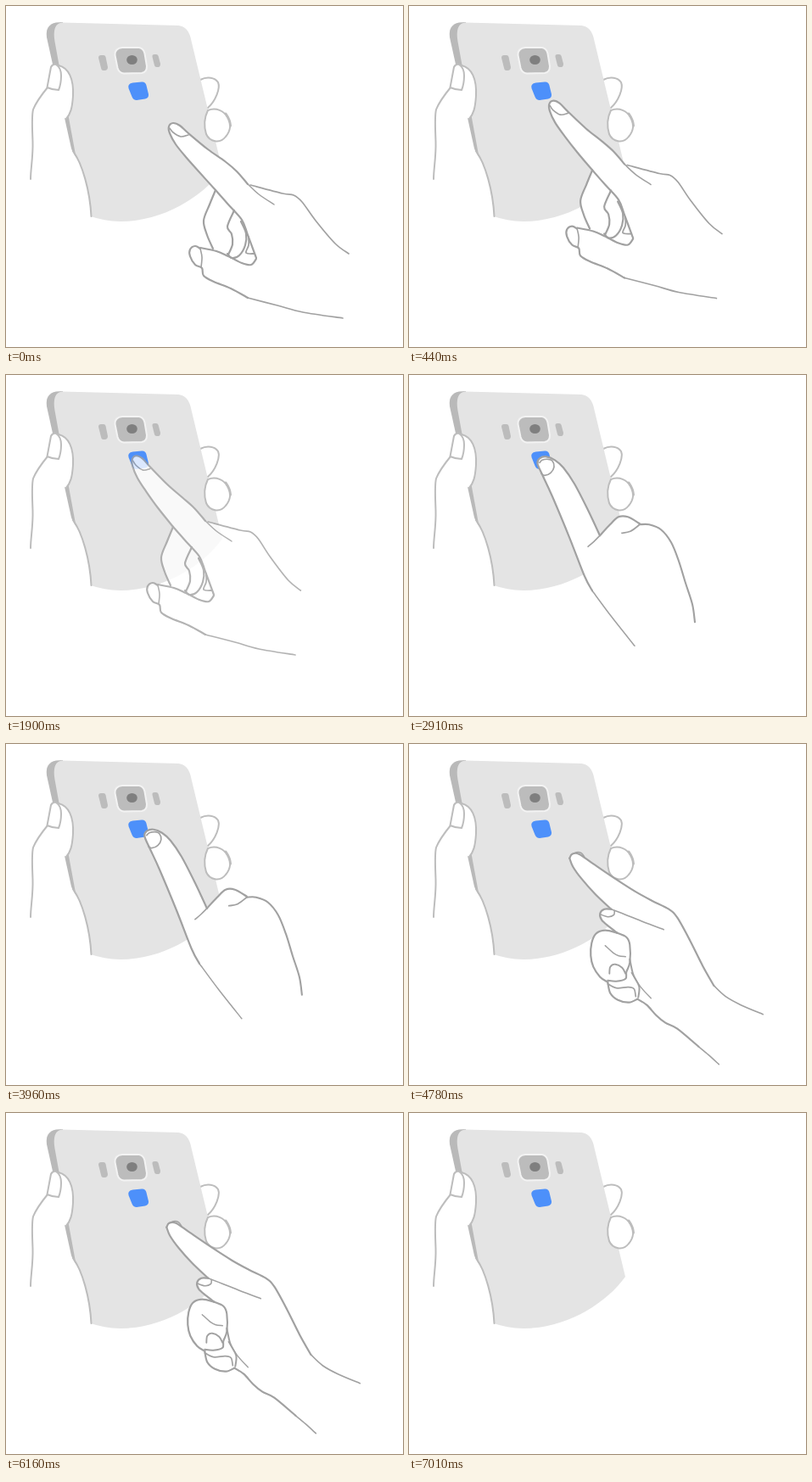
An HTML page for the animation above (7.39 s loop, 468 by 402 pixels).

```html
<!DOCTYPE html>
<html lang="en">
<head>
<meta charset="utf-8">
<title>Rear sensor tap</title>
<style>
html, body { margin: 0; width: 100%; height: 100%; overflow: hidden; background: #fff; }
svg { display: block; width: 468px; height: 402px; }
.grip { fill: #fff; stroke: #bdbdbd; stroke-width: 2; stroke-linecap: round; stroke-linejoin: round; }
.line { fill: none; }
.hand { fill: none; stroke: #a1a1a1; stroke-linecap: round; stroke-linejoin: round; }
.skin { fill: #fff; stroke: none; }
</style>
</head>
<body>
<svg viewBox="0 0 468 402">
  <g class="grip">
    <path d="M230 87C237 83 246 84 250 90C253 97 247 112 238 120L225 120Z" stroke="none"/>
    <path class="line" d="M229 87C237 83 246 84 250 90C253 97 247 112 238 120"/>
  </g>
  <path fill="#b9b9b9" d="M67 19L59 19.500Q46 22 48 37L77 168Q79 174 85 182L84 150Z"/>
  <path fill="#e4e4e4" d="M66 19.500L203 23Q214 24 217.500 37L255 193C232 225 185 254 135 254Q115 253.500 100 248C99 222 94 198 85 181Q82 177 81 170L57.500 42Q54 21 66 19.500Z"/>
  <g fill="#bcbcbc">
    <path stroke="#f3f3f3" stroke-width="2" d="M137 49L157 49Q162 50 163.500 56L166 71Q166 78 160 79L139 79.500Q133 79 131.500 73L128.500 58Q128 50 137 49Z"/>
    <path d="M109 61Q109 58 112 58L115 58Q117 58 117.500 60L120 72Q120 75.500 117 76L114.500 76Q112.500 76 112 73Z"/>
    <path d="M172.500 60Q172 57 175 57L177 57Q179 57 179.600 59L182 68Q182 71.500 180 72L177.500 72Q175.500 72 175 70Z"/>
  </g>
  <ellipse cx="148.500" cy="63.500" rx="6.300" ry="5.500" fill="#7f7f7f"/>
  <path fill="#4d90fa" d="M149.500 90.500L160 89.500Q164 89 165.300 93L168 104Q168.500 108.500 164 109.500L154 111Q150 111 148.500 107L144.500 97Q143 91.500 149.500 90.500Z"/>
  <g class="grip">
    <path d="M49 96L54 70L62 70C74 73 80 86 79 106C78 121 76 127 71 133L55 125Z" stroke="none"/>
    <path class="line" d="M29 204C29 192 32 178 31.500 160C31 145 30 130 32 122Q36 112 49 96M62 70C74 73 80 86 79 106C78 121 76 127 71 133M79 171C90 186 99 218 100.500 248"/>
    <path d="M48.500 96L53 72Q55 68 59 69Q65 73 65 82Q65 92 62 99Q55 99 48.500 96Z"/>
    <path d="M238 123C248 119 257 124 261 131C266 138 265 147 259 154C252 163 240 160 236 151C233 141 234 131 238 123Z"/>
    <path class="line" stroke-width="3" d="M259 127Q264 134 264.500 141"/>
  </g>
  <g id="hands"></g>
</svg>
<script>
const NS = 'http://www.w3.org/2000/svg';
const LOOP = 7390, STEP = 40;
const easeIn = p => t => t ** p;
const easeOut = p => t => 1 - (1 - t) ** p;
const easeInOut = p => t => t < .5 ? .5 * (2 * t) ** p : 1 - .5 * (2 - 2 * t) ** p;

// Bends the fingertip upwards and tucks the wrist in as the finger taps.
function bend([x, y], u) {
  const p = 1 - u;
  const tip = Math.max(0, 1 - Math.hypot(x - 194, y - 141) / 80);
  return [x + p * (7 * tip - 50 - Math.max(0, x - 330) * .09), y + p * (-5 * tip - 38)];
}

// lines: [points, stroke width]; skin: the parts that bound the white fill
// moves: [start, end, distance from, distance to, easing]
const hands = [
  {
    show: 0, fade: [1860, 2060],
    place: bend,
    lines: {
      wrist: ['404,292 388,280 365,253 349,231 339,223 326,221 288,211', 1.7],
      crease: ['316,234 298,222 285,210', 1.5],
      finger: ['285,210 272,195 258,183 238,169 215,150 205,141 197,138 192,142 193,150 200,163 212,178 228,196 247,217', 2.2],
      palm: ['247,217 262,234 278,252 285,270 295,297', 2.2],
      nail: ['193,144 197,149 206,154 215,152', 1.6],
      curl: ['247,217 240,234 233,253 237,270 244,286', 2.2],
      second: ['269,241 261,260 266,269 267,281 262,293', 2.2],
      third: ['277,254 283,268 282,282 275,294 266,297 261,292', 2.2],
      fourth: ['286,272 286,282 283,291 293,292', 1.8],
      base: ['229,285 248,289 262,295 278,303 289,305 295,298', 2.2],
      thumb: ['229,286 223,283 217,287 217,295 223,305 231,309 233,318 245,325 265,333 285,344', 2.2],
      thumbNail: ['229,286 231,296 230,308', 1.6],
      heel: ['285,344 320,353 350,361 397,368', 1.7]
    },
    skin: ['finger', 'curl', 'thumb', 'heel', 'wrist'],
    moves: [
      [0, 560, 1, 0, easeIn(2)],
      [810, 1250, 0, .97, easeOut(3)],
      [1250, 1650, .97, 0, easeIn(2.5)]
    ]
  },
  {
    show: 2230, fade: [4290, 4490],
    place: ([x, y], u) => [x - 5 + 38 * u, y - 1 + 27 * Math.min(u * u, u)],
    lines: {
      arm: ['267,320 240,286 217,255', 1.5],
      finger: ['217,255 208,238 190,192 170,144 158,118 152.5,105 155,99 163,97 173,101 183,110 196,129 212,160 226,190', 2.2],
      nail: ['157,117 161,119 168,116 172,109 170,102 165,100 158,101 155,104', 1.7],
      web: ['212,203 219,197 226,190', 1.6],
      knuckle: ['226,190 238,177 248,168 259,168 273,176', 2.2],
      fold: ['252,187 262,185 273,177', 1.8],
      back: ['273,177 284,177 298,183 310,198 319,220 327,246 335,271 338,292', 2.1]
    },
    skin: ['arm', 'finger', 'knuckle', 'back'],
    moves: [
      [2230, 2790, 1.55, 0, easeIn(2)],
      [2790, 3390, 0, 1, easeInOut(1.7)],
      [3640, 4080, 1, 0, easeIn(1.7)]
    ]
  },
  {
    show: 4660, fade: [6730, 7010],
    place: ([x, y], u) => [x + 43 * u, y + 33 * u],
    lines: {
      top: ['148,103 151,98 159,98 175,109 200,126 225,142 245,153 265,163 275,173 290,200 305,230 318,253', 2.2],
      wrist: ['318,253 332,266 350,276 376,287', 1.7],
      under: ['197,163 178,145 162,127 152,113 148,103', 2.2],
      crease: ['197,163 215,170 235,178 259,187', 1.6],
      nail: ['150,99 156,96 162,97 166,102', 1.4],
      thumb: ['204,191 195,184 186,176 184,168 189,163 197,163', 2.2],
      thumbNail: ['184,169 193,172 200,170 201,165', 1.6],
      fist: ['193,249 184,243 176,231 173,218 174,203 179,192 190,188 204,191', 2.2],
      joint: ['204,191 215,196 219,205 219,226 215,237 214,245 203,248 193,247', 2.1],
      fistNail: ['195,239 196,231 202,228 210,232 214,239', 1.9],
      fold: ['190,206 200,215 206,218 214,219', 1.5],
      low: ['228,269 218,273 205,270 196,262 193,249', 2.2],
      lowNail: ['193,251 203,256 217,255 224,257 226,266', 1.7],
      side: ['219,222 223,240 230,254 229,267', 2],
      palm: ['221,238 232,255 244,268', 1.4],
      heel: ['300,325 275,304 261,297 250,288 239,276 228,269', 2.2],
      arm: ['324,346 312,335 300,325', 1.6]
    },
    skin: ['top', 'wrist', 'arm', 'heel', 'low', 'fist', 'thumb', 'under'],
    moves: [
      [4660, 5260, 1, 0, easeIn(2)],
      [5470, 5830, 0, 1, easeOut(2)],
      [6080, 6560, 1, 0, easeIn(1.8)]
    ]
  }
];

function add(parent, tag, attrs) {
  const el = document.createElementNS(NS, tag);
  for (const key in attrs) el.setAttribute(key, attrs[key]);
  return parent.appendChild(el);
}

// Smooth curve through the points.
function curve(pts, start) {
  let d = start + pts[0];
  for (let i = 0; i < pts.length - 1; i++) {
    const b = pts[i], c = pts[i + 1], a = pts[i - 1] || b, e = pts[i + 2] || c;
    const c1 = [0, 1].map(k => b[k] + (c[k] - a[k]) / 6);
    const c2 = [0, 1].map(k => c[k] - (e[k] - b[k]) / 6);
    d += `C${c1} ${c2} ${c}`;
  }
  return d;
}

for (const hand of hands) {
  hand.group = add(document.getElementById('hands'), 'g', { class: 'hand' });
  hand.fill = add(hand.group, 'path', { class: 'skin' });
  hand.parts = {};
  for (const [name, [text, width]] of Object.entries(hand.lines)) {
    hand.parts[name] = {
      pts: text.split(' ').map(p => p.split(',').map(Number)),
      el: add(hand.group, 'path', { 'stroke-width': width })
    };
  }
}

const stepped = (t, start, end) =>
  Math.min(1, Math.max(0, Math.floor((t - start) / STEP) * STEP / (end - start)));

function distance(moves, t) {
  const [start, end, from, to, ease] = moves.filter(m => m[0] <= t).pop();
  return from + (to - from) * ease(stepped(t, start, end));
}

function draw(t) {
  for (const hand of hands) {
    const alpha = t < hand.show ? 0 : 1 - stepped(t, ...hand.fade);
    hand.group.style.display = alpha > 0 ? '' : 'none';
    if (alpha <= 0) continue;
    hand.group.style.opacity = alpha;
    const u = distance(hand.moves, t);
    const moved = {};
    for (const [name, { pts, el }] of Object.entries(hand.parts)) {
      moved[name] = pts.map(p => hand.place(p, u));
      el.setAttribute('d', curve(moved[name], 'M'));
    }
    hand.fill.setAttribute('d', hand.skin.map((n, i) => curve(moved[n], i ? 'L' : 'M')).join('') + 'Z');
  }
}

const begin = performance.now();
function tick() {
  draw((performance.now() - begin) % LOOP);
  requestAnimationFrame(tick);
}
tick();
</script>
</body>
</html>
```
